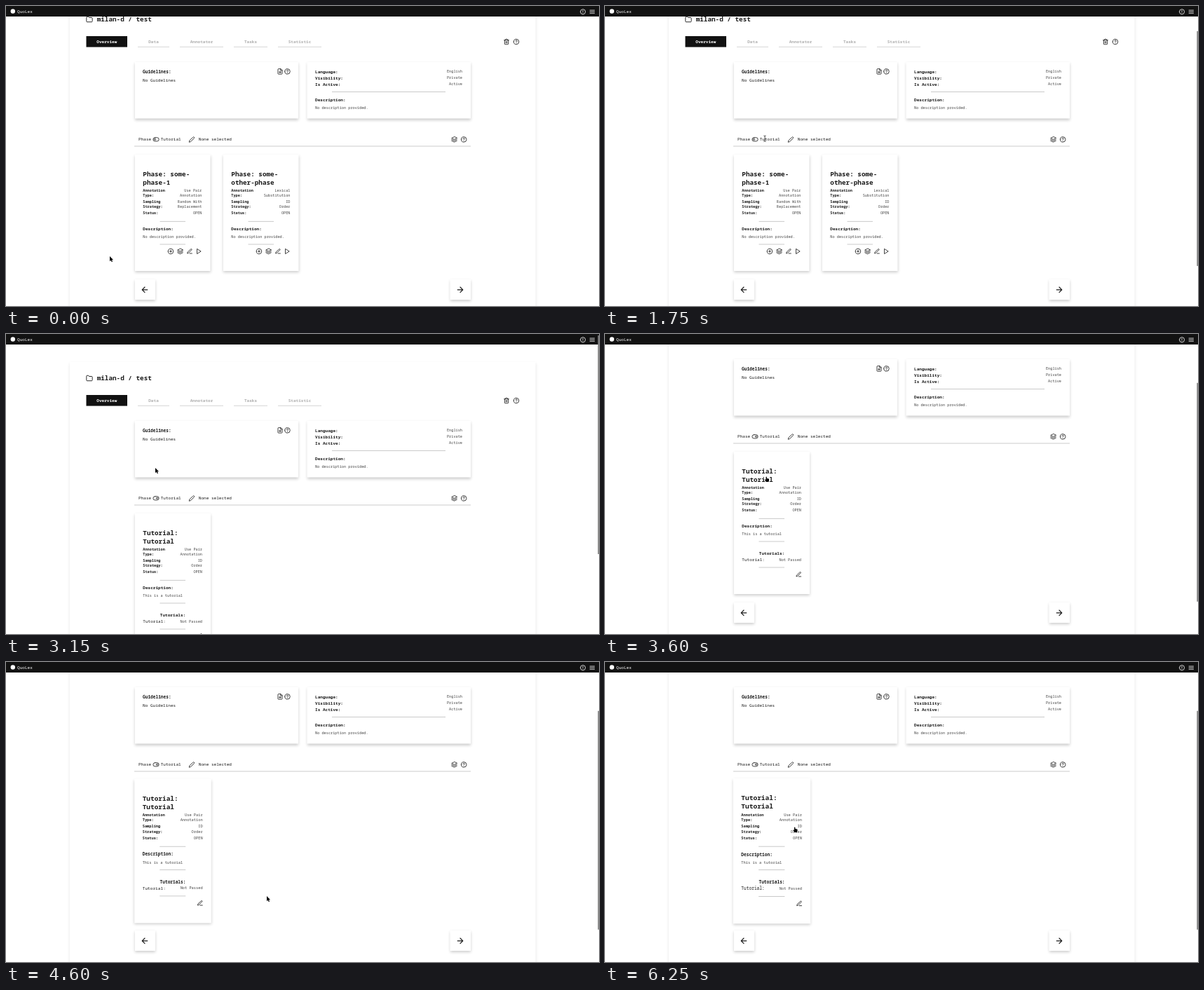
An HTML page with a canvas that plays this animation: 846x428 px, repeating every 6750 ms.

```html
<!DOCTYPE html>
<html lang="en">
<head>
<meta charset="utf-8">
<title>Project overview</title>
<style>
html, body { margin: 0; width: 100%; height: 100%; overflow: hidden; background: #fff; }
canvas { display: block; }
</style>
</head>
<body>
<canvas id="stage" width="846" height="428"></canvas>
<script>
const c = document.getElementById('stage').getContext('2d');
const LOOP = 6750, STEP = 50, SWITCH = 2400;
const INK = '#1a1a1a', SOFT = '#444', MUTED = '#adadad', RULE = '#bdbdbd';
const SMALL = 5.25, BODY = 6.05, HEAD = 9.3;

// Icons on a 24 unit grid
const circle = 'M2 12a10 10 0 1 0 20 0a10 10 0 1 0-20 0';
const icons = {
  help: circle + 'M9 9a3 3 0 0 1 6 1c0 2-3 3-3 3M12 17v.1',
  alert: circle + 'M12 7v5M12 16v.1',
  add: circle + 'M12 8v8M8 12h8',
  menu: 'M3 6h18M3 12h18M3 18h18',
  folder: 'M22 19a2 2 0 0 1-2 2H4a2 2 0 0 1-2-2V5a2 2 0 0 1 2-2h5l2 3h9a2 2 0 0 1 2 2z',
  trash: 'M3 6h18M19 6v14a2 2 0 0 1-2 2H7a2 2 0 0 1-2-2V6m3 0V4a2 2 0 0 1 2-2h4a2 2 0 0 1 2 2v2M10 11v6M14 11v6',
  file: 'M14 2H6a2 2 0 0 0-2 2v16a2 2 0 0 0 2 2h12a2 2 0 0 0 2-2V8zv6h6M12 11v7M8.5 14.5h7',
  layers: 'M12 2L2 7l10 5 10-5zM2 17l10 5 10-5M2 12l10 5 10-5',
  pencil: 'M17 3a2.8 2.8 0 0 1 4 4L7.5 20.5 2 22l1.5-5.5z',
  edit: 'M12 20h9M16.5 3.5a2.1 2.1 0 0 1 3 3L7 19l-4 1 1-4z',
  play: 'M5 3l14 9-14 9z',
  left: 'M19 12H5m7 7l-7-7 7-7',
  right: 'M5 12h14m-7 7l7-7-7-7',
  toggleOff: 'M8 5h8a7 7 0 0 1 0 14H8A7 7 0 0 1 8 5M5 12a3 3 0 1 0 6 0a3 3 0 1 0-6 0',
  toggleOn: 'M8 5h8a7 7 0 0 1 0 14H8A7 7 0 0 1 8 5M13 12a3 3 0 1 0 6 0a3 3 0 1 0-6 0'
};
for (const name in icons) icons[name] = new Path2D(icons[name]);

const ARROW = 0, HAND = 1, BEAM = 2;
const pointers = [
  new Path2D('M0 0v7.2l1.7-1.5 1.1 2.5 1.2-.5-1.1-2.4h2.2z'),
  new Path2D('M0 .6Q.7-.5 1.4.6V2.6L4 3.1Q4.8 3.4 4.6 4.4L4 7.4H.4L-1.7 4.6Q-1.5 3.6-.6 4.1L0 4.6z'),
  new Path2D('M-1.6-4Q0-4 0-3Q0-4 1.6-4M0-3V3.4M-1.6 4.4Q0 4.4 0 3.4Q0 4.4 1.6 4.4')
];

// Keys: time, x, y, pointer shape
const pointerKeys = [
  [0, 148, 357, ARROW], [1000, 148, 357, ARROW], [1200, 185, 320, HAND],
  [1550, 236, 213, ARROW], [1650, 239, 196, BEAM], [1750, 228, 189, BEAM],
  [1950, 218, 188, HAND], [2100, 214, 190, HAND], [SWITCH, 213, 191, ARROW],
  [3150, 213, 191, ARROW], [3500, 229.5, 203.5, HAND], [3850, 229.5, 203.5, HAND],
  [4000, 183, 247, ARROW], [4050, 169, 257, ARROW], [4100, 163, 268, ARROW],
  [4150, 190, 290, HAND], [4250, 320, 335, ARROW], [4350, 538, 362, ARROW],
  [4500, 408, 354, ARROW], [4600, 372, 334, ARROW], [4700, 349, 286, ARROW],
  [4800, 338, 248, ARROW], [4950, 338, 248, ARROW], [5200, 337, 247, ARROW],
  [5400, 337, 247, ARROW], [5650, 329, 243, ARROW], [5850, 329, 243, ARROW],
  [6050, 291, 239, HAND], [6250, 270, 235.5, HAND]
];
const hoverKeys = [
  [0, 1], [1200, 1], [1350, 1.02], [1500, 1.02], [1650, 1], [3600, 1],
  [3850, 1.022], [4050, 1.016], [4600, 1.014], [4800, 1], [6000, 1], [6200, 1.022]
];
const scrollKeys = [[0, 44], [SWITCH - 1, 44], [SWITCH, 0], [3150, 0], [3300, 50], [3500, 88]];

function sample(keys, t) {
  let i = keys.length - 1;
  while (keys[i][0] > t) i--;
  const a = keys[i], b = keys[i + 1] || a;
  const k = b === a ? 0 : (t - a[0]) / (b[0] - a[0]);
  return a.slice(1).map((v, j) => v + (b[j + 1] - v) * k);
}

function pointerShape(t) {
  return pointerKeys.filter(key => key[0] <= t).pop()[3];
}

// Text is laid out large and scaled down so that small sizes keep exact advances
function text(str, x, y, size = BODY, weight = 500, color = INK, align = 'left') {
  c.save();
  c.translate(x, y + size * .33);
  c.scale(.1, .1);
  c.font = `${weight} ${size * 10}px "Noto Sans Mono", "DejaVu Sans Mono", monospace`;
  c.fillStyle = color;
  c.textAlign = align;
  c.fillText(str, 0, 0);
  c.restore();
}

function icon(name, x, y, size = 9, color = INK) {
  c.save();
  c.translate(x - size / 2, y - size / 2);
  c.scale(size / 24, size / 24);
  c.lineWidth = 2.2;
  c.lineCap = c.lineJoin = 'round';
  c.strokeStyle = color;
  c.stroke(icons[name]);
  c.restore();
}

function rect(x, y, w, h, color) {
  c.fillStyle = color;
  c.fillRect(x, y, w, h);
}

const rule = (x1, x2, y, color = RULE) => rect(x1, y - .4, x2 - x1, .8, color);

function panel(x, y, w, h, alpha = .2) {
  c.save();
  c.shadowColor = `rgba(0,0,0,${alpha})`;
  c.shadowBlur = 4;
  c.shadowOffsetY = 2;
  rect(x, y, w, h, '#fff');
  c.restore();
}

function pair(label, value, x, right, y) {
  text(label, x, y, SMALL, 600);
  text(value, right, y, SMALL, 400, SOFT, 'right');
}

function phaseCard(x, width, height, scale, info) {
  const top = 256, left = x + 11.3, right = x + width - 12, mid = x + 54;
  c.save();
  c.translate(mid, top + height / 2);
  c.scale(scale, scale);
  c.translate(-mid, -top - height / 2);
  panel(x, top, width, height);
  info.title.forEach((line, i) => text(line, left, 283.5 + 12 * i, HEAD, 700));
  pair('Annotation', info.type[0], left, right, 307);
  pair('Type:', info.type[1], left, right, 314.3);
  pair('Sampling', info.sampling[0], left, right, 323.2);
  pair('Strategy:', info.sampling[1], left, right, 330.7);
  pair('Status:', 'OPEN', left, right, 339.7);
  rule(x + 35.5, x + 72, 351.3);
  text('Description:', left, 362.4, BODY, 600);
  text(info.description, left, 373.6, SMALL, 400, SOFT);
  rule(x + 35.5, x + 72, 384);
  if (info.tutorial) {
    text('Tutorials:', mid, 401, BODY, 600, INK, 'center');
    text('Tutorial:', left, 410);
    text('Not Passed', right, 410, SMALL, 400, SOFT, 'right');
    rule(x + 35.5, x + 72, 421);
    icon('edit', x + 92.3, 431);
  } else {
    ['add', 'layers', 'edit', 'play'].forEach((name, i) => icon(name, x + 51 + 13.5 * i, 394));
  }
  c.restore();
}

const phases = [
  { title: ['Phase: some-', 'phase-1'], type: ['Use Pair', 'Annotation'],
    sampling: ['Random With', 'Replacement'], description: 'No description provided.' },
  { title: ['Phase: some-', 'other-phase'], type: ['Lexical', 'Substitution'],
    sampling: ['ID', 'Order'], description: 'No description provided.' }
];
const tutorial = { title: ['Tutorial:', 'Tutorial'], type: ['Use Pair', 'Annotation'],
  sampling: ['ID', 'Order'], description: 'This is a tutorial', tutorial: true };

function header() {
  icon('folder', 119, 63, 10);
  text('milan-d / test', 129.7, 63, HEAD, 700);
  rect(114.5, 87, 58.5, 15.6, '#111');
  text('Overview', 143.8, 94.8, BODY, 600, '#fff', 'center');
  const tabs = [['Data', 188, 233], ['Annotator', 248, 310], ['Tasks', 325, 373], ['Statistic', 388, 450]];
  for (const [label, x1, x2] of tabs) {
    text(label, (x1 + x2) / 2, 94.8, BODY, 600, MUTED, 'center');
    rule(x1, x2, 102.3, '#ccc');
  }
  icon('trash', 714, 95);
  icon('help', 728, 95);
}

function details() {
  panel(184, 124, 233, 80.5);
  text('Guidelines:', 195, 137.6, BODY + .1, 700);
  text('No Guidelines', 195, 149.6);
  icon('file', 391, 137.4);
  icon('help', 401.5, 137.4);

  panel(429.5, 124, 233.5, 80.5);
  const facts = [['Language:', 'English'], ['Visibility:', 'Private'], ['Is Active:', 'Active']];
  facts.forEach(([label, value], i) => {
    text(label, 441, 137.6 + 9 * i, BODY, 600);
    text(value, 651, 137.6 + 9 * i, SMALL, 400, SOFT, 'right');
  });
  rule(465, 627, 166.4);
  text('Description:', 441, 177.6, BODY, 600);
  text('No description provided.', 441, 188.8, SMALL, 400, SOFT);
}

function toolbar(showTutorial) {
  text('Phase', 189, 234.5);
  icon(showTutorial ? 'toggleOn' : 'toggleOff', 214, 234.3);
  text('Tutorial', 220.7, 234.5);
  icon('pencil', 265, 234.5);
  text('None selected', 274.8, 234.5);
  icon('layers', 639.5, 234.4);
  icon('help', 653.2, 234.4);
  rule(183, 663, 244);
}

function navBar() {
  rect(0, 0, 846, 15, '#121212');
  c.fillStyle = '#fff';
  c.beginPath();
  c.arc(9.8, 7.5, 3.2, 0, 7);
  c.fill();
  text('QuoLex', 16, 7.8, BODY, 500, '#fff');
  icon('alert', 823, 8.2, 8.6, '#fff');
  icon('menu', 836.3, 8.2, 8.6, '#fff');
}

function pointer(t) {
  const [x, y] = sample(pointerKeys, t), shape = pointerShape(t);
  c.save();
  c.translate(x, y);
  c.lineJoin = 'round';
  c.lineWidth = shape === BEAM ? .8 : 1;
  c.strokeStyle = shape === BEAM ? '#222' : '#fff';
  c.stroke(pointers[shape]);
  c.fillStyle = '#000';
  if (shape !== BEAM) c.fill(pointers[shape]);
  c.restore();
}

function draw(t) {
  const [scroll] = sample(scrollKeys, t), [hover] = sample(hoverKeys, t);
  const showTutorial = t >= SWITCH;
  rect(0, 0, 846, 428, '#fff');
  c.save();
  c.translate(0, -scroll);
  panel(91, 40, 664.5, 560, .1);
  header();
  details();
  toolbar(showTutorial);
  if (showTutorial) {
    phaseCard(184, 108, 203, hover, tutorial);
  } else {
    phaseCard(184, 107.5, 166, hover, phases[0]);
    phaseCard(310, 107.5, 166, 1, phases[1]);
  }
  const buttonTop = showTutorial ? 471 : 434;
  panel(184, buttonTop, 29, 29);
  panel(633.5, buttonTop, 29.5, 29);
  icon('left', 198, buttonTop + 14.8, 13);
  icon('right', 648, buttonTop + 14.8, 13);
  c.restore();

  navBar();
  if (t >= 1000) {
    rect(844.4, 2 + scroll * .77, 1.6, showTutorial ? 312 : 335, '#808080');
  }
  pointer(t);
}

function frame(now) {
  draw(Math.floor(now % LOOP / STEP) * STEP);
  requestAnimationFrame(frame);
}
requestAnimationFrame(frame);
</script>
</body>
</html>
```
